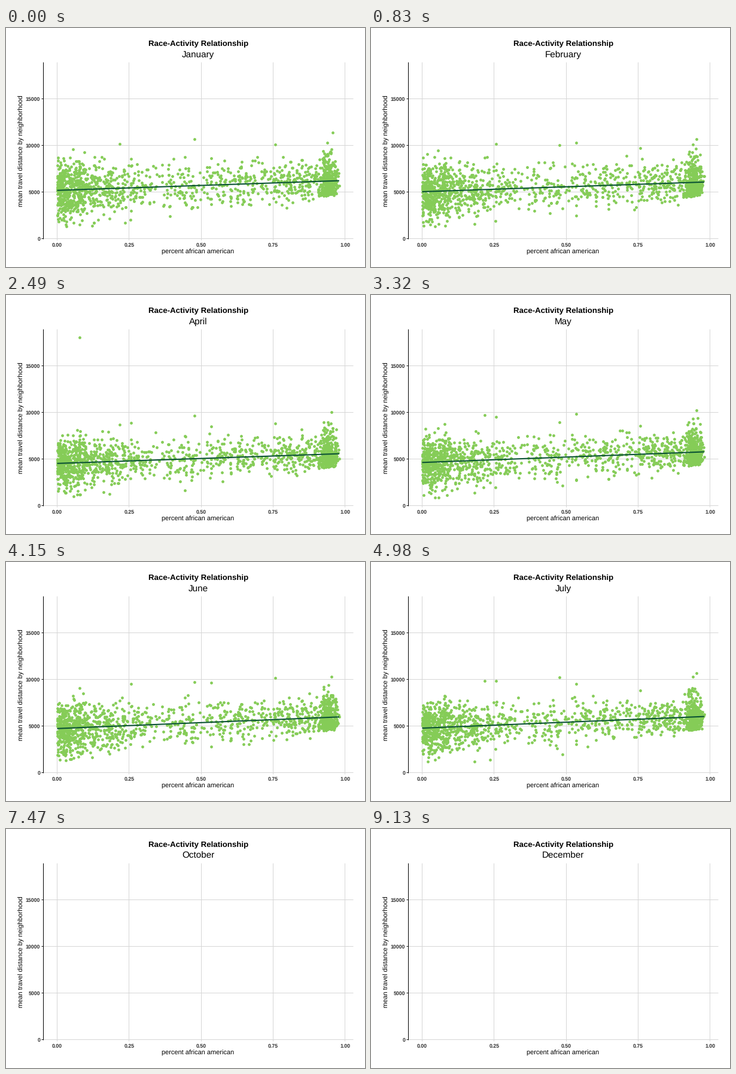
These frames come from a looping animation (600x400 px, 9960 ms). A matplotlib script:

```python
import numpy as np
import matplotlib.pyplot as plt
from matplotlib.animation import FuncAnimation

W, H, DPI = 600, 400, 100
LEFT, RIGHT, TOP, BOTTOM = 62, 580, 57, 352.4
GREEN, DARK, GRID = "#85cc57", "#0b5334", "#d6d6d6"
MONTHS = ["January", "February", "March", "April", "May", "June", "July",
          "August", "September", "October", "November", "December"]
DATA_MONTHS = 8
LAST_SHARE = .98
PEAK_MONTH, PEAK = 3, (.078, 18100)
HIGH_SHARES = [.055, .078, .217, .257, .478, .535, .758, .941, .954]
LOW_SHARES = [.045, .058, .182]

plt.rcParams["text.hinting"] = "none"


def px(share):
    return 85.5 + 481 * np.asarray(share)


def py(distance):
    return BOTTOM - 0.01557 * np.asarray(distance)


def noise(rng, n, terms):
    """Sum of uniforms with unit variance: bell-like, without long tails."""
    return rng.uniform(-1, 1, (terms, n)).sum(axis=0) * np.sqrt(3 / terms)


def make_shares(rng):
    spread = np.interp(rng.random(1120),
                       [0, .20, .36, .50, .60, .71, .84, 1],
                       [0, .045, .1, .19, .29, .5, .75, .94])
    cluster = rng.normal(.945, .016, 330)
    return np.concatenate([spread, cluster[cluster < LAST_SHARE]])


rng = np.random.default_rng(12)
shares = make_shares(rng)
base = noise(rng, len(shares), 2)
sigma = np.interp(shares, [0, .3, .9, 1], [1530, 1300, 1130, 1000])


def trend_ends(month):
    """Distances dip in April, then recover with a steeper slope."""
    start = np.interp(month, [0, 2, 3, 5, 7], [5180, 4890, 4530, 4730, 4820])
    rise = np.interp(month, [3, 5], [1040, 1250])
    return np.array([start, start + rise])


def month_points(month):
    rng = np.random.default_rng(100 + month)
    z = .88 * base + .45 * noise(rng, len(shares), 3)
    z += np.where(shares > .9, .2 * (z * z - 1), 0)
    tightness = np.interp(month, [0, 3], [1, .9])

    high = rng.uniform(2700, 5000, len(HIGH_SHARES))
    low = rng.uniform(-3900, -2900, len(LOW_SHARES))
    x = np.concatenate([shares, HIGH_SHARES, LOW_SHARES])
    offset = np.concatenate([sigma * z * tightness, high, low])
    y = np.interp(x, [0, LAST_SHARE], trend_ends(month)) + offset
    if month == PEAK_MONTH:
        x, y = np.append(x, PEAK[0]), np.append(y, PEAK[1])
    return np.column_stack([px(x), py(y)])


fig = plt.figure(figsize=(W / DPI, H / DPI), dpi=DPI, facecolor="white")
ax = fig.add_axes([0, 0, 1, 1])
ax.set(xlim=(0, W), ylim=(H, 0))
ax.axis("off")


def line(x, y, color, width, z):
    return ax.plot(x, y, color=color, lw=width * 72 / DPI, zorder=z,
                   solid_capstyle="butt")[0]


def label(x, y, text, size, color="black", ha="center", **kw):
    return ax.text(x, y, text, fontsize=size * 72 / DPI, color=color, ha=ha,
                   va="baseline", family="Liberation Sans", **kw)


# Straight rules snap to whole pixels, so they sit half a pixel back
for v in (0, 5000, 10000, 15000):
    row = py(v) - .5
    line([LEFT, RIGHT], [row, row], GRID, 1, 1)
    line([LEFT - 3, LEFT], [row, row], "#222222", 1, 2)
    label(57.3, py(v) + 3.2, str(v), 8.8, "#333333", "right", weight="bold")
for v in (0, .25, .5, .75, 1):
    column = px(v) - .5
    line([column, column], [TOP, BOTTOM + 3], GRID, 1, 1)
    label(px(v), 366.2, f"{v:.2f}", 8.8, "#333333", weight="bold")
line([LEFT, LEFT], [TOP, BOTTOM + .6], "black", 1, 2)

label(321.2, 30.2, "Race-Activity Relationship", 13.3, weight="bold")
subtitle = label(321.2, 49.2, "", 15.3)
label(321, 378.2, "percent african american", 11)
label(28.6, 205.5, "mean travel distance by neighborhood", 11,
      rotation=90, rotation_mode="anchor")

dots = ax.scatter([], [], s=(4.8 * 72 / DPI) ** 2, color=GREEN,
                  linewidths=0, zorder=3)
trend = line([], [], DARK, 2.1, 4)


def update(month):
    subtitle.set_text(MONTHS[month])
    has_data = month < DATA_MONTHS
    dots.set_visible(has_data)
    trend.set_visible(has_data)
    if has_data:
        dots.set_offsets(month_points(month))
        trend.set_data(px([0, LAST_SHARE]), py(trend_ends(month)))
    return dots, trend, subtitle


anim = FuncAnimation(fig, update, frames=len(MONTHS), interval=830,
                     repeat=True, repeat_delay=0, blit=False)
plt.show()
```
